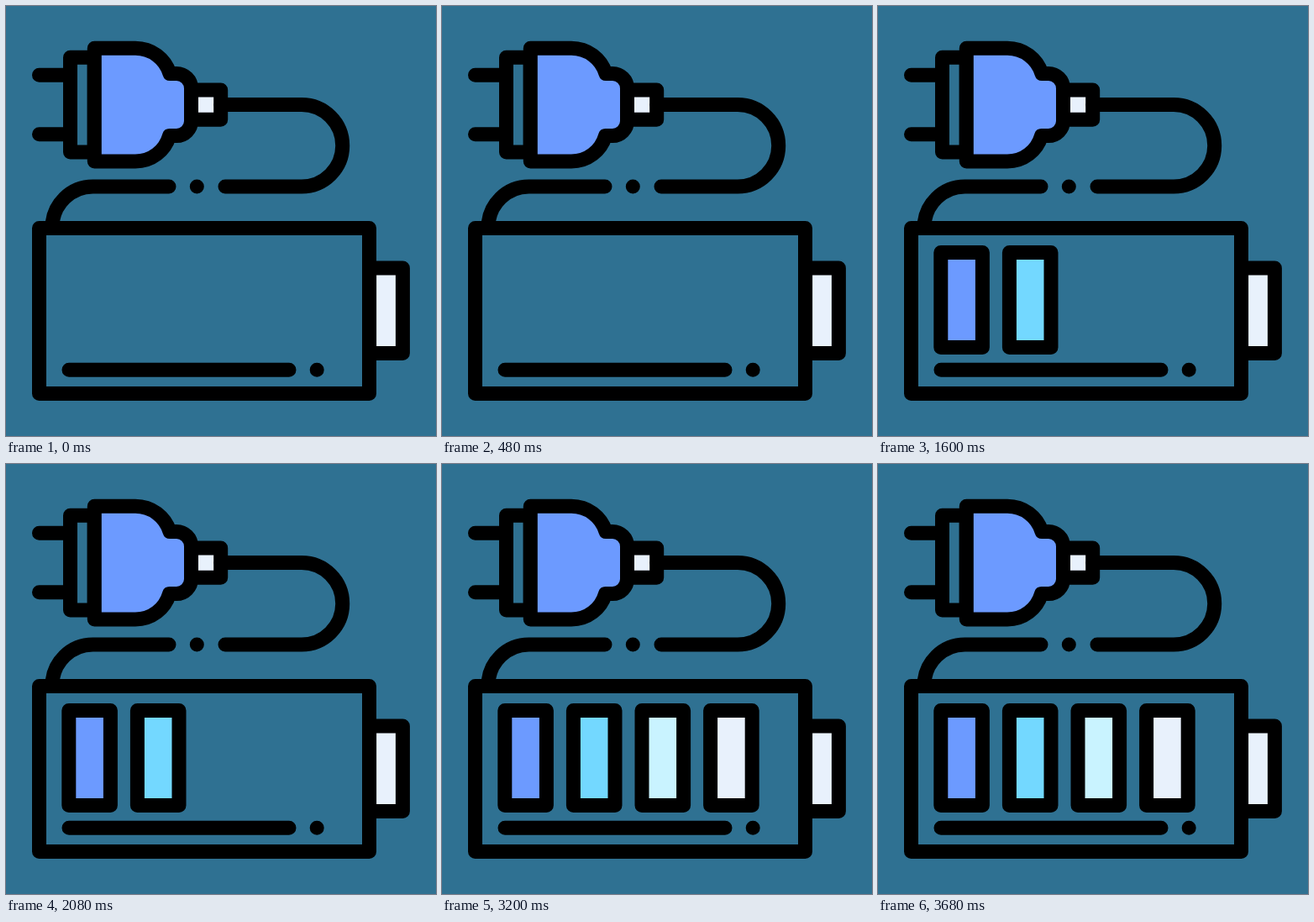
These frames come from a looping animation (512x512 px, 4 s). An HTML page:

```html
<!DOCTYPE html>
<html lang="en">
<head>
<meta charset="utf-8">
<title>Charging battery</title>
<style>
  html, body { margin: 0; width: 100%; height: 100%; overflow: hidden; background: #2f7192; }
  svg { display: block; width: 100vw; height: 100vh; }
  .ink { fill: none; stroke: #000; stroke-width: 17; stroke-linecap: round; stroke-linejoin: round; }
  .blue { fill: #6c9aff; }
  .sky { fill: #73d8ff; }
  .ice { fill: #c9f3ff; }
  .pale { fill: #e8f1fc; }
  .cell { animation: 4s step-end infinite; }
  .c1 { animation-name: show1; }
  .c2 { animation-name: show2; }
  .c3 { animation-name: show3; }
  .c4 { animation-name: show4; }
  @keyframes show1 { 0% { opacity: 0 } 20%, 100% { opacity: 1 } }
  @keyframes show2 { 0% { opacity: 0 } 40%, 100% { opacity: 1 } }
  @keyframes show3 { 0% { opacity: 0 } 60%, 100% { opacity: 1 } }
  @keyframes show4 { 0% { opacity: 0 } 80%, 100% { opacity: 1 } }
</style>
</head>
<body>
<svg viewBox="0 0 512 512">
  <g class="ink">
    <!-- plug -->
    <path d="M39.5 82.3H76M39.5 152.7H76"/>
    <rect x="76.5" y="61.2" width="28.7" height="112.8"/>
    <path class="blue" d="M105.3 50.3H154C173 50.3 189.5 62.5 195 80.5H203A17.5 17.5 0 0 1 220.5 98V137A17.5 17.5 0 0 1 203 154.5H194.5C189.5 172.5 173 185 154 185H105.3Z"/>
    <rect class="pale" x="220.5" y="100" width="35.2" height="35.2"/>

    <!-- cable -->
    <path d="M256 117.6H352A48.7 48.7 0 0 1 352 215H261M227.3 215h.01M194 215H103.5C77 215 56 236 55 262"/>

    <!-- battery -->
    <rect class="pale" x="432.6" y="312" width="39.8" height="101.6"/>
    <rect x="39.5" y="264.4" width="393" height="197.2"/>
    <path d="M75 433.2H337M370.2 433.2h.01"/>

    <!-- charge -->
    <rect class="cell c1 blue" x="74.8" y="293.4" width="49.6" height="113"/>
    <rect class="cell c2 sky" x="156.4" y="293.4" width="49.6" height="113"/>
    <rect class="cell c3 ice" x="238" y="293.4" width="49.6" height="113"/>
    <rect class="cell c4 pale" x="319.6" y="293.4" width="49.6" height="113"/>
  </g>
</svg>
</body>
</html>
```
